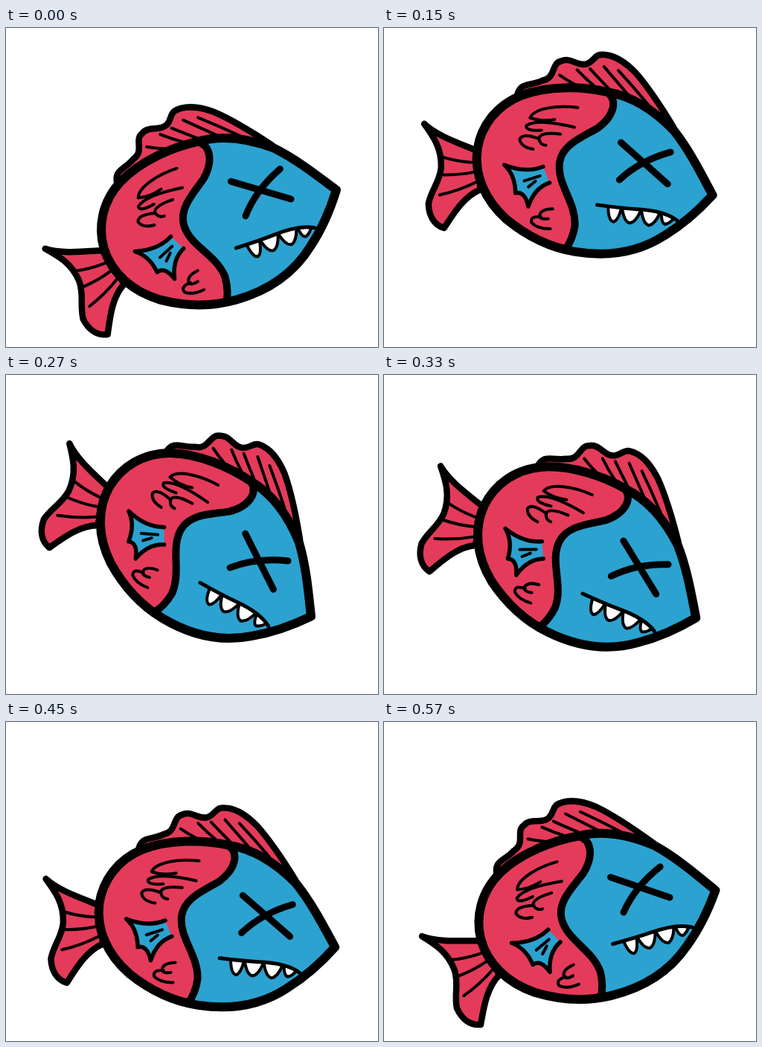
An HTML page for the animation above (0.6 s loop, 500 by 429 pixels).

```html
<!DOCTYPE html>
<html lang="en">
<head>
<meta charset="utf-8">
<title>Flopping fish</title>
<style>
  html, body { margin: 0; width: 100%; height: 100%; overflow: hidden; background: #fff; }
  svg { display: block; width: 100vw; height: 100vh; }
  #fish { fill: none; stroke: #000; stroke-linecap: round; stroke-linejoin: round; }
  .red { fill: #e43b5a; }
  .blue { fill: #2ca2d0; }
  .white { fill: #fff; }
  .flat { stroke: none; }
</style>
</head>
<body>
<svg viewBox="0 0 500 429">
  <defs>
    <path id="body" d="M447 225C428 200 408 172 382 148C350 124 318 111 285 111C250 109 205 115 172 134C140 153 125 184 125 215C126 250 146 281 179 302C210 320 244 330 277 330C320 330 360 318 392 289C412 272 432 248 447 225Z"/>
    <clipPath id="inside"><use href="#body"/></clipPath>
  </defs>
  <g id="fish">
    <!-- tail and back fin -->
    <g stroke-width="8.5">
      <path class="red" d="M49 193C68 206 98 211 124 217L138 268C118 280 108 304 98 327C84 325 75 314 72 298C73 278 82 268 81 248C78 222 64 208 49 193Z"/>
      <path class="red" d="M166 138C166 116 180 121 196 110C214 104 204 85 217 80C228 72 240 84 252 78C264 70 258 62 277 62C290 62 306 70 318 79C340 97 364 124 381 144L285 125Z"/>
    </g>
    <path stroke-width="4" d="M79 233Q100 236 120 234M81 257Q106 254 126 246M85 284Q110 274 132 258
      M186 126L204 119M218 99Q228 104 240 108M240 88Q253 98 268 107M257 84Q271 95 286 106M275 78Q295 95 314 111M295 80Q318 98 342 119"/>
    <!-- body -->
    <use href="#body" class="blue flat"/>
    <g clip-path="url(#inside)">
      <path class="red" stroke-width="10" d="M283 111C302 118 299 142 280 161C262 176 237 190 237 214C237 244 268 264 271 296C271 308 269 318 264 328L100 345V95Z"/>
    </g>
    <use href="#body" stroke-width="12"/>
    <!-- scales -->
    <path stroke-width="4" d="M249 138C222 139 192 148 188 162Q204 165 221 159M249 165Q198 161 185 173Q184 181 206 176M232 177Q206 178 204 187Q207 196 215 195M205 188Q181 183 179 193Q183 203 199 203
      M238 278Q221 281 222 291Q225 295 234 292M224 291Q209 292 213 301Q222 308 239 305"/>
    <!-- side fin -->
    <path class="blue" stroke-width="5.5" d="M216 224Q194 237 164 230Q181 241 185 265Q197 260 205 280Q209 254 228 244"/>
    <path stroke-width="4" d="M194 247L214 237M201 254L209 245"/>
    <!-- eye and mouth -->
    <path stroke-width="9" d="M314 175L385 220M382 177Q343 195 320 225"/>
    <path class="white" stroke-width="4" d="M311 263Q314 281 321 282Q327 280 329 262M330 262Q335 279 343 280Q351 278 355 261M356 261Q361 278 369 279Q377 276 381 260M383 260Q385 273 390 274Q396 272 400 265"/>
    <path stroke-width="5" d="M296 263Q330 262 350 260Q386 256 405 266"/>
  </g>
</svg>
<script>
const fish = document.getElementById("fish");
const LOOP = 600, STEP = 30;
// [time in ms, value] pairs
const drop = [[0, 48], [150, -32], [450, 48], [600, 48]];
const tilt = [[0, -16], [90, 0], [150, 9.3], [270, 31], [300, 30.5], [390, 17.4], [510, 0], [570, -13.5], [600, -16]];

function at(keys, t) {
  const i = keys.findIndex(k => k[0] > t);
  const [t0, a] = keys[i - 1], [t1, b] = keys[i];
  return a + (b - a) * (t - t0) / (t1 - t0);
}

function draw(now) {
  const t = Math.floor(now % LOOP / STEP) * STEP;
  fish.setAttribute("transform", `translate(0 ${at(drop, t)}) rotate(${at(tilt, t)} 249 208)`);
}

const start = performance.now();
function frame() {
  draw(performance.now() - start);
  requestAnimationFrame(frame);
}
frame();
</script>
</body>
</html>
```
